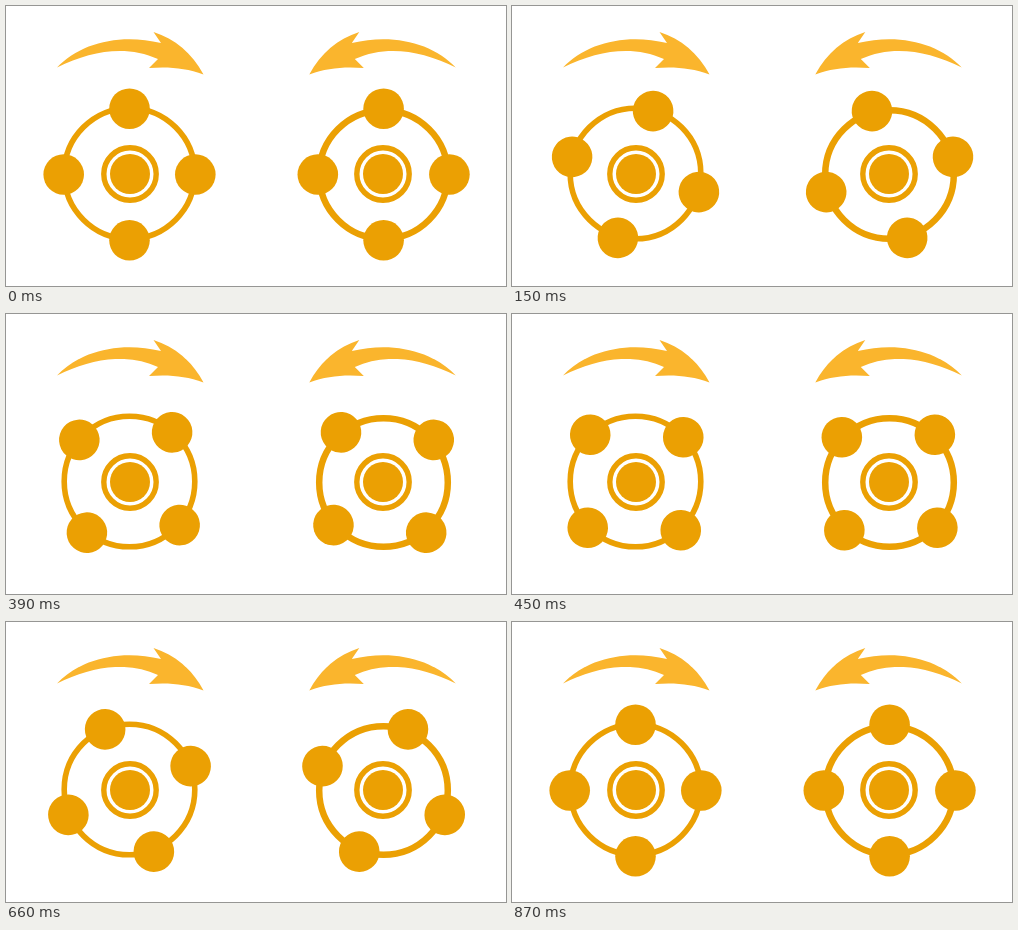
Recreate the animation shown at these times as an HTML page. Size 500 px wide and 280 px high, loop 900 ms.

```html
<!DOCTYPE html>
<html lang="en">
<head>
<meta charset="utf-8">
<title>Counter-rotating wheels</title>
<style>
  html, body { margin: 0; width: 100%; height: 100%; overflow: hidden; background: #fff; }
  svg { display: block; width: 100vw; height: 100vh; }
</style>
</head>
<body>
<svg viewBox="0 0 500 280" fill="#eba003">
  <defs>
    <path id="arrow" fill="#fab52d" d="M51 61.5C74 37 114 27 155 37L147.5 26C169 33 186 47 197.5 68.5C180 62 163 60.5 143 62L152 53C121 39 86 44 51 61.5Z"/>
    <g id="hub">
      <circle r="26.2" fill="none" stroke="#eba003" stroke-width="5.4"/>
      <circle r="20"/>
    </g>
    <g id="balls">
      <circle cy="-65.8" r="20.3"/>
      <circle cx="65.8" r="20.3"/>
      <circle cy="65.8" r="20.3"/>
      <circle cx="-65.8" r="20.3"/>
    </g>
  </defs>
  <use href="#arrow"/>
  <use href="#arrow" transform="translate(500.8 0) scale(-1 1)"/>
  <g fill="none" stroke="#eba003">
    <circle cx="123.5" cy="167.5" r="65.3" stroke-width="5.6"/>
    <circle cx="377.5" cy="168.5" r="64.3" stroke-width="6.5"/>
  </g>
  <use href="#hub" x="124" y="168"/>
  <use href="#hub" x="377" y="168"/>
  <use id="left" href="#balls"/>
  <use id="right" href="#balls"/>
</svg>
<script>
  const LOOP = 900, STEP = 30, LAST = LOOP / STEP - 1;
  const left = document.getElementById('left');
  const right = document.getElementById('right');

  function turn(el, x, y, deg) {
    el.setAttribute('transform', `translate(${x} ${y}) rotate(${deg})`);
  }

  // A quarter turn per loop, in even steps; the last pose equals the first.
  function draw(ms) {
    const deg = 90 * Math.floor((ms % LOOP) / STEP) / LAST;
    turn(left, 123.5, 168.5, deg);
    turn(right, 377.6, 168.5, -deg);
  }

  const start = performance.now();
  function tick() {
    draw(performance.now() - start);
    requestAnimationFrame(tick);
  }
  draw(0);
  requestAnimationFrame(tick);
</script>
</body>
</html>
```
